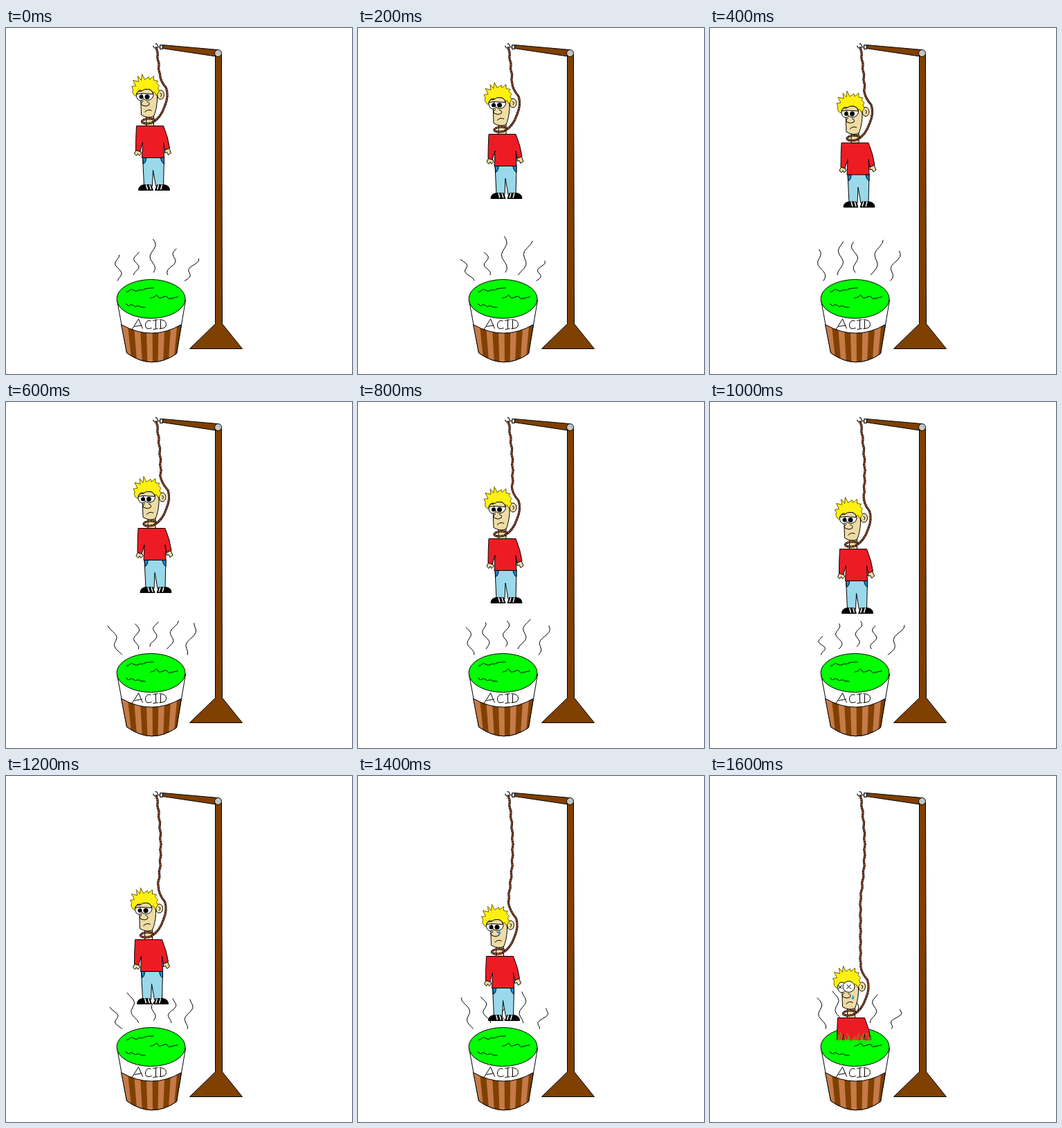
These frames come from a looping animation (500x500 px, 1800 ms). An HTML page with a canvas:

```html
<!DOCTYPE html>
<html lang="en">
<head>
<meta charset="utf-8">
<title>Acid bucket</title>
<style>
  html, body { margin: 0; width: 100%; height: 100%; overflow: hidden; background: #fff; }
  canvas { display: block; }
</style>
</head>
<body>
<canvas id="stage" width="500" height="500"></canvas>
<script>
const ctx = document.getElementById('stage').getContext('2d');
const STEP = 200;
const BROWN = '#7f4000', SKIN = '#efdca4', GREEN = '#00ff00', RED = '#ed1c24';

// How far the man has been lowered, and his sideways sway, at each step.
const DROP = [0, 12, 24.5, 41, 56, 71, 95, 119, 208];
const SWAY = [0, 0.5, 1.5, 2.5, 0.5, -1, -2, -3, -4];
const LAST = DROP.length - 1;

function noise(a, b, c) {
  const v = Math.sin(a * 12.99 + b * 78.23 + c * 37.72) * 43758.55;
  return (v - Math.floor(v)) * 2 - 1;
}

function shape(d, fill, stroke = '#000', width = 1) {
  const path = new Path2D(d);
  if (fill) { ctx.fillStyle = fill; ctx.fill(path); }
  if (stroke) { ctx.strokeStyle = stroke; ctx.lineWidth = width; ctx.stroke(path); }
}

function oval(x, y, rx, ry, fill, stroke = '#000') {
  ctx.beginPath();
  ctx.ellipse(x, y, rx, ry, 0, 0, Math.PI * 2);
  if (fill) { ctx.fillStyle = fill; ctx.fill(); }
  if (stroke) { ctx.strokeStyle = stroke; ctx.lineWidth = 1; ctx.stroke(); }
}

function drawGallows() {
  shape('M226 24L306 31V41L226 29Z', BROWN);
  shape('M302 38H311L312 427L341 463H265L302 427Z', BROWN);
  oval(306, 36, 5, 5, '#c3c3c3');
  shape('M222 24H226V30H222Z', '#c3c3c3');
  shape('M222 27H219Q219 22 215 22M212 25Q213 29 218 29', null, '#444', 1.5);
}

function drawBucket(sunk) {
  shape('M160 393L174 469Q210 495 246 470L259 393Z', '#fff');
  ctx.save();
  ctx.clip(new Path2D('M166 428Q210 453 253 428L246 470Q210 495 174 469Z'));
  ctx.fillStyle = '#c67a48';
  ctx.fillRect(160, 425, 100, 65);
  for (let i = 0; i < 5; i++) {
    const top = 175 + i * 18, foot = 181.5 + i * 15;
    shape(`M${top} 425H${top + 9}L${foot + 7.5} 486H${foot}Z`, BROWN, null);
  }
  ctx.restore();
  shape('M166 428Q210 453 253 428L246 470Q210 495 174 469Z', null);
  oval(209, 391, 49.5, 28, GREEN);

  if (!sunk) shape('M173 381L177 380L180 377L188 380L192 378L197 378L202 376L213 375', null);
  shape('M208 390L214 388L217 385L221 390L231 387L235 391L248 388', null);
  shape('M172 398L177 401L181 399L186 402L192 401L195 403H201', null);
  // Hand-lettered ACID label
  shape('M181 436L191 420L197 434M185 431L196 429', null);
  shape('M209 423Q204 420 201 427Q200 437 210 433', null);
  shape('M212 422L219 421M216 421V434M212 435L219 434', null);
  shape('M223 422V434M221 421Q231 421 231 428Q231 434 221 434', null);
}

// Five wavy lines fan out from the rim, redrawn with new noise at every step.
function drawSteam(step) {
  ctx.strokeStyle = '#000';
  ctx.lineWidth = 1;
  for (let i = 0; i < 5; i++) {
    const arch = Math.sin(Math.PI * i / 4);
    const footX = 164 + 23.5 * i, footY = 365 - 12 * arch;
    const lean = (i - 1.7) * 6 + noise(step, i, 1) * 6;
    const height = 37 + 6 * arch + noise(step, i, 2) * 10;
    ctx.beginPath();
    for (let t = 0; t <= 1.01; t += 0.1) {
      const wave = 4 * Math.sin(t * 9 + noise(step, i, 3) * 3);
      ctx.lineTo(footX + lean * t + wave, footY - height * t);
    }
    ctx.stroke();
  }
}

function drawEyes(dead) {
  oval(194, 97, 6, 7.5, '#fff');
  oval(204, 96, 8.5, 8, '#fff');
  if (dead) {
    shape('M189 94L194 99M194 94L189 99M201 93L207 99M207 93L201 99', null);
    return;
  }
  shape('M188 95Q190 90 195 91Q199 87 205 88Q211 89 212 95L196 94Z', SKIN);
  oval(195, 99, 3, 3, '#000', null);
  oval(203.5, 99, 3.5, 3.5, '#000', null);
}

function drawHead(dead) {
  shape('M202 126V141H213V126Z', SKIN);
  oval(223, 96, 5, 6.5, SKIN);
  shape('M222 94Q226 94 223 99', null);
  shape('M194 94L195 125Q205 131 213 127Q217 118 218 104V88Q205 80 194 88Z', SKIN);
  shape('M187 98Q181 95 183 88L181 84L187 83L183 75L191 77L190 69L195 75L196 66L200 74' +
    'L206 70L207 74L213 69V75L219 76L217 79L221 83L219 86L221 91L217 97' +
    'L214 92L211 94Q205 88 196 91L190 92Z', '#fff010', '#6b5d00');
  drawEyes(dead);
  shape('M198 105Q193 108 196 111Q202 114 206 111Q208 107 203 106', SKIN);
  shape('M200 121Q205 116 210 119', null);
}

function drawShoe(x, flip) {
  ctx.save();
  ctx.translate(x, 0);
  ctx.scale(flip, 1);
  shape('M0 234Q0 227 8 226H18L21 234Z', '#000');
  shape('M11 226L13 233M16 226L18 233', null, '#fff', 1.5);
  ctx.restore();
}

function drawBody() {
  shape('M188 175L185 181L188 184L190 181L192 184L195 181L193 176Z', SKIN);
  shape('M229 174V180L232 179L234 183L238 180L235 173Z', SKIN);
  shape('M197 186L199 228H211L212 205L216 228H227L228 186Z', '#99d9ea');
  shape('M197 187H202Q202 194 198 196Z', '#1689dc');
  shape('M228 187H223Q224 194 228 196Z', '#1689dc');
  drawShoe(191, 1);
  drawShoe(236, -1);
  shape('M188 141H227Q234 158 236 173L229 176L227 165L228 187H196L197 165L193 178L187 176Q187 158 188 141Z', RED);
}

function drawMan(step, dx, dy, sunk) {
  ctx.save();
  if (sunk) {
    ctx.beginPath();
    ctx.rect(0, 0, 500, 381);
    ctx.clip();
  }
  ctx.translate(dx, dy);
  drawBody();
  drawHead(sunk);
  const slide = step - (LAST - 1);
  if (slide >= 0) {
    ctx.translate(207 + 3 * slide, 107 + 5 * slide);
    shape('M0 -4Q3 1 1 2Q-1 3 -2 1Z', '#2b9be5', null);
  }
  ctx.restore();
}

function drawCord(path) {
  for (const [color, width, dash] of [['#24120a', 3.2, []], ['#965033', 1.8, []], ['#24120a', 2.2, [1, 3]]]) {
    ctx.strokeStyle = color;
    ctx.lineWidth = width;
    ctx.setLineDash(dash);
    ctx.stroke(path);
  }
  ctx.setLineDash([]);
}

// The upper rope bulges to the right, then passes behind the ear to the noose.
function drawRope(dx, dy) {
  const rope = new Path2D('M217 27');
  for (let y = 30; y <= 66 + dy; y += 4) {
    const bulge = Math.sin(Math.PI * Math.min(1, (y - 27) / 150));
    rope.lineTo(217 + 6 * bulge + 0.7 * Math.sin(y * 0.4), y);
  }
  const tail = new Path2D('M231 86Q235 98 229 112Q223 130 211 136');
  const noose = new Path2D();
  noose.ellipse(205, 134, 9, 3.5, -0.1, 0, Math.PI * 2);
  rope.quadraticCurveTo(222 + dx, 76 + dy, 231 + dx, 86 + dy);
  rope.addPath(tail, new DOMMatrix().translate(dx, dy));
  rope.addPath(noose, new DOMMatrix().translate(dx, dy));
  drawCord(rope);
}

function drawSplash() {
  for (let i = 0; i < 18; i++) {
    const x = 184 + i * 2.8;
    const tipX = x + noise(i, 1, 4) * 5, tipY = 374 + noise(i, 2, 4) * 4;
    shape(`M${x} 383Q${x} 377 ${tipX} ${tipY}`, null, i % 4 === 3 ? RED : '#4fc41c');
  }
}

function draw(time) {
  const step = Math.floor(time / STEP) % DROP.length;
  const dx = SWAY[step], dy = DROP[step], sunk = step === LAST;
  ctx.fillStyle = '#fff';
  ctx.fillRect(0, 0, 500, 500);
  ctx.lineJoin = 'round';
  ctx.save();
  ctx.translate(0.5, 0.5);
  drawGallows();
  drawBucket(sunk);
  drawSteam(step);
  drawMan(step, dx, dy, sunk);
  drawRope(dx, dy);
  if (sunk) drawSplash();
  ctx.restore();
}

let start;
function tick(now) {
  start ??= now;
  draw(now - start);
  requestAnimationFrame(tick);
}
draw(0);
requestAnimationFrame(tick);
</script>
</body>
</html>
```
